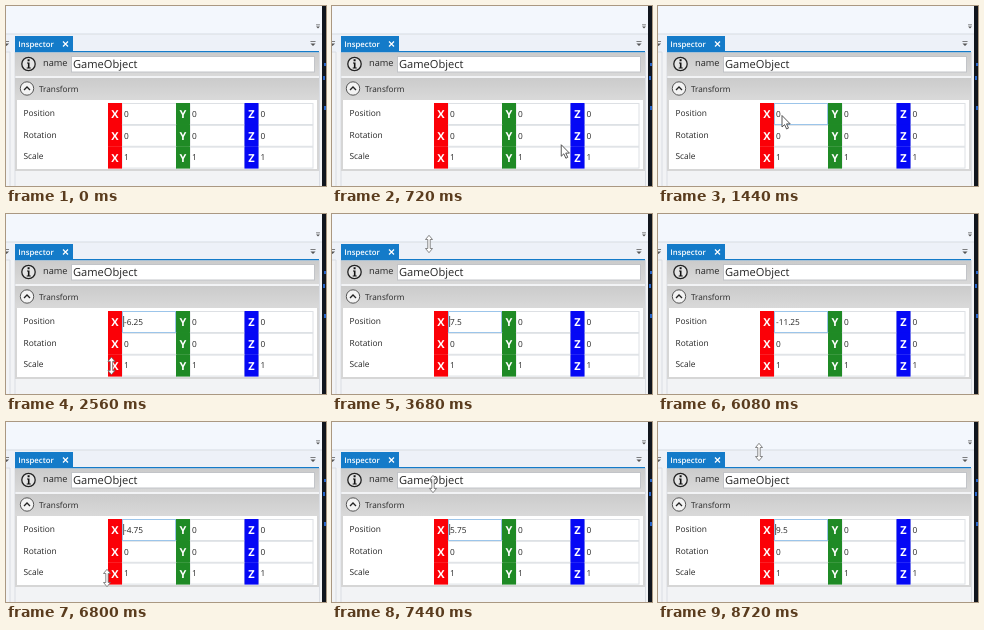
Write an HTML page that moves like this. It is 320 px wide and 180 px high and loops after 8880 ms.

```html
<!DOCTYPE html>
<html lang="en">
<head>
<meta charset="utf-8">
<title>Inspector</title>
<style>
  html, body { margin: 0; width: 100%; height: 100%; overflow: hidden; background: #f2f3f5; }
  svg {
    display: block; width: 100vw; height: 100vh; fill: #262626; filter: blur(.35px);
    font-family: "Open Sans", "Noto Sans", sans-serif; text-rendering: geometricPrecision;
  }
</style>
</head>
<body>
<svg viewBox="0 0 320 180">
  <defs>
    <linearGradient id="bar" x2="0" y2="1">
      <stop stop-color="#cbcbcb"/><stop offset="1" stop-color="#d9d9d9"/>
    </linearGradient>
    <path id="menu" d="M-3-3h6v1h-6zM-3 0h6l-3 3z" fill="#555"/>
  </defs>

  <!-- window frame -->
  <rect width="320" height="180" fill="#f2f3f5"/>
  <rect width="316" height="28" fill="#f3f7fd"/>
  <rect y="27.5" width="316" height="1" fill="#d6dbe4"/>
  <rect y="29" width="316" height="17" fill="#edf1f8"/>
  <path d="M0 46h4v134M9 46V180M313.5 46V180" fill="none" stroke="#dadde3"/>
  <rect x="316" width="4" height="180" fill="#10151d"/>
  <path d="M317 70h2v4h-2zM318 57h2v3h-2zM318 100h2v4h-2z" fill="#2563c8"/>
  <use href="#menu" transform="translate(.5 37.5) scale(.85)"/>
  <use href="#menu" transform="translate(307 37.5) scale(.85)"/>
  <use href="#menu" transform="translate(312 20.5) scale(.65)"/>

  <!-- tab -->
  <path d="M9 30h58v15h246v1.5H9z" fill="#147bc9"/>
  <text x="12.3" y="41" font-size="7.8" font-weight="600" fill="#fff">Inspector</text>
  <path d="M57 35.5l5 5m0-5l-5 5" stroke="#fff" stroke-width="1.2"/>

  <!-- name row -->
  <rect x="9" y="46.5" width="304" height="23.5" fill="url(#bar)"/>
  <circle cx="22.5" cy="58" r="6.7" fill="#e4e4e4" stroke="#222" stroke-width="1.3"/>
  <path d="M21 56.5h2.5v5h1.2v1h-4v-1h1.2v-4H21zM21.6 53.3h2v2h-2z" fill="#111"/>
  <text x="37" y="60" font-size="9.2">name</text>
  <rect x="65.5" y="50.5" width="243" height="15.5" fill="#fff" stroke="#c2c4c8"/>
  <text x="67" y="62.3" font-size="11.1">GameObject</text>

  <!-- transform section -->
  <rect x="10" y="73" width="302" height="91" fill="#fff" stroke="#d6d6d6" stroke-width="2"/>
  <rect x="9" y="72" width="304" height="22" fill="url(#bar)"/>
  <circle cx="21" cy="82.5" r="6.7" fill="#f3f3f3" stroke="#555"/>
  <path d="M18 84l3-3 3 3" fill="none" stroke="#222" stroke-width="1.3"/>
  <text x="33" y="85.6" font-size="8.2">Transform</text>
  <g id="rows"></g>
  <rect id="focus" x="116.5" y="97.5" width="53" height="21" fill="none" stroke="#9cc5ea"/>
  <rect id="caret" x="117.3" y="102" width=".8" height="11" fill="#333"/>

  <!-- pointers, centred on their hot spots -->
  <g id="arrow" fill="#fff" stroke="#444" stroke-width=".9">
    <path d="M0 0v11.5l2.6-2.4 2 4.4 1.9-.9-2-4.2h3.7z"/>
  </g>
  <g id="sizer" fill="#fff" stroke="#6a6a6a" stroke-width=".8">
    <path d="M0-8.7l3.5 4.2H1.2v9H3.5L0 8.7l-3.5-4.2h2.3v-9H-3.5z"/>
  </g>
</svg>
<script>
const LOOP = 8880, STEP = 80, FOCUS = 1360, PRESS = 2000, WRAP = 6160;
const $ = id => document.getElementById(id);

const axes = [["X", 102, "#fb0007"], ["Y", 170, "#1f8a25"], ["Z", 238.5, "#0508f5"]];
$("rows").innerHTML = ["Position", "Rotation", "Scale"].map((label, row) => {
  const y = 97 + row * 21.8;
  const fields = axes.map(([axis, x, color]) => `
    <rect x="${x + 14}" y="${y + .5}" width="54.5" height="21" fill="#fff" stroke="#dde0e4"/>
    <rect x="${x}" y="${y}" width="14" height="22" fill="${color}"/>
    <text x="${x + 7}" y="${y + 15}" font-size="11" font-weight="700" fill="#fff" text-anchor="middle">${axis}</text>
    <text x="${x + 16}" y="${y + 13.8}" font-size="8.3" class="value">${row === 2 ? 1 : 0}</text>`).join("");
  return `<text x="17.5" y="${y + 12.8}" font-size="8.4">${label}</text>${fields}`;
}).join("");
const positionX = document.querySelector(".value");

// Pointer path: time, x, y
const path = [
  [0, 345, 152], [400, 335, 152], [960, 150, 124], [1300, 124, 109.5], [1560, 124, 109.5],
  [1920, 109, 97.5], [2080, 109, 97.5], [2720, 104, 162], [3680, 97, 30], [3920, 96, 28],
  [5040, 94, 128], [5760, 95, 167], [6080, 97, 197], [6400, 99, 199], [6800, 101, 156],
  [7440, 101, 62], [8080, 101, 26], [8720, 101, 30], [8880, 101, 30]
];

function slope(i, k) {
  const a = path[i - 1], b = path[i], c = path[i + 1];
  if (!a || !c || (b[k] - a[k]) * (c[k] - b[k]) <= 0) return 0;
  return (c[k] - a[k]) / (c[0] - a[0]);
}

function pointer(t, k) {
  const i = path.findIndex(p => p[0] > t), a = path[i - 1], b = path[i];
  const span = b[0] - a[0], u = (t - a[0]) / span, v = 1 - u;
  return v * v * (1 + 2 * u) * a[k] + u * u * (3 - 2 * u) * b[k]
    + span * u * v * (v * slope(i - 1, k) - u * slope(i, k));
}

const show = (el, on) => el.style.display = on ? "" : "none";

function draw(now) {
  const t = Math.min(Math.floor(now % LOOP / STEP) * STEP, LOOP - 2 * STEP);
  const x = pointer(t, 1), y = pointer(t, 2);
  const dragging = t >= PRESS;
  const zero = t < WRAP ? 97 : 114;
  positionX.textContent = dragging ? Math.round((zero - y) * .1125 * 4) / 4 || 0 : 0;
  show($("focus"), t >= FOCUS);
  show($("caret"), t > 1500 && t % 1060 < 530);
  show($("arrow"), !dragging);
  show($("sizer"), dragging);
  $(dragging ? "sizer" : "arrow").setAttribute("transform", `translate(${x} ${y})`);
}

const start = performance.now();
function tick() {
  draw(performance.now() - start);
  requestAnimationFrame(tick);
}
tick();
</script>
</body>
</html>
```
